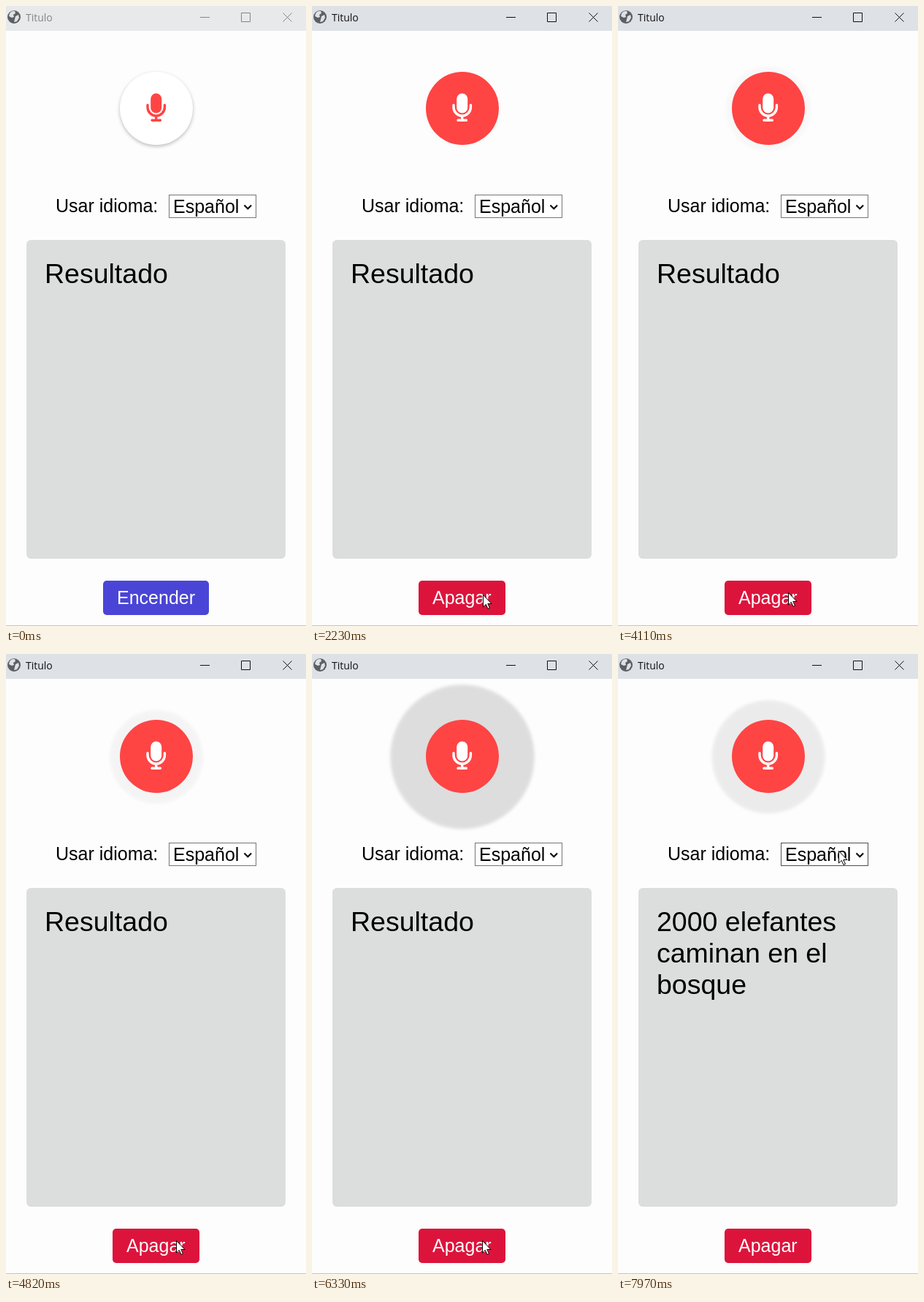
An HTML page that plays this animation: 411x848 px, repeating every 8 s.

```html
<!DOCTYPE html>
<html lang="es">
<head>
<meta charset="utf-8">
<title>Titulo</title>
<style>
html, body { margin: 0; width: 100%; height: 100%; overflow: hidden; background: #fdfdfd; }
#mic { position: absolute; left: 156px; top: 90px; width: 100px; height: 100px; border-radius: 50%; }
svg { position: absolute; left: 0; top: 0; }
text { font: 25px "Liberation Sans", Arial, sans-serif; }
#result text { font-size: 37.5px; }
#bar text { font: 14px "Open Sans", "Noto Sans", sans-serif; }
</style>
</head>
<body>
<div id="mic"></div>
<svg width="411" height="848" viewBox="0 0 411 848">
  <rect id="barBack" width="411" height="34"/>
  <circle cx="11" cy="15" r="9" fill="#5c5f63"/>
  <path d="M5 10q3-4 7-3l1 3-3 2 1 3-3 1-4-2zM13 14l4-2 1 4-3 5-4 1 1-4z" fill="#dfe2e5"/>
  <g id="bar">
    <text x="27" y="21">Titulo</text>
    <path d="M266 15.5h13M322.5 9.5h12v12h-12zM379.500 9.500l12 12m0-12l-12 12" fill="none"/>
  </g>

  <g id="icon" stroke-linecap="round">
    <rect x="198.200" y="119.500" width="15" height="27" rx="7.500" stroke="none"/>
    <path d="M194 135.500v3a11.700 11.700 0 0 0 23.400 0v-3M205.700 151v5M200 156.300h11.400" fill="none" stroke-width="3.400"/>
  </g>

  <text x="68" y="282">Usar idioma:</text>
  <rect id="select" x="223.500" y="258.500" width="119" height="31" fill="#fff"/>
  <text x="229" y="283">Español</text>
  <path d="M326.500 272.500l4.800 4.800 4.800-4.800" fill="none" stroke="#000" stroke-width="2"/>

  <rect x="28" y="320" width="355" height="436" rx="6" fill="#dcdedd"/>
  <g id="result">
    <text x="53" y="379">Resultado</text>
    <g>
      <text x="53" y="379">2000 elefantes</text>
      <text x="53" y="422">caminan en el</text>
      <text x="53" y="465">bosque</text>
    </g>
  </g>

  <rect id="button" y="786" height="47" rx="5"/>
  <text id="label" y="818" fill="#fff"></text>
  <rect y="847" width="411" height="1" fill="#c4c4c4"/>
  <path id="cursor" d="M.5.5v16.500l3.800-3.600 2.700 6 2.500-1.100-2.700-5.800h5.200z" fill="#fff" stroke="#000"/>
</svg>
<script>
const LOOP = 8000, FOCUS = 1580, CLICK = 1670, PULSE = 2193, HEARD = 6700;
const PERIOD = 920, SPREAD = 49, ALPHA = 0.128;

// time, x, y of the pointer tip
const PATH = [
  [130, 380, 856], [160, 367, 838], [500, 300, 822], [920, 235, 807], [1010, 234, 805],
  [2450, 234, 805], [2900, 233, 802], [6480, 233, 802], [6540, 254, 776], [6690, 280, 745],
  [6780, 295, 710], [6920, 315, 668], [7080, 335, 650], [7220, 375, 610], [7330, 388, 500],
  [7400, 386, 390], [7560, 368, 345], [7680, 350, 318], [7850, 318, 280], [7970, 302, 269]
];

const $ = id => document.getElementById(id);
const clamp = v => Math.min(1, Math.max(0, v));
const mix = (a, b, k) => a + (b - a) * k;
const set = (node, attrs) => {
  for (const key in attrs) node.setAttribute(key, attrs[key]);
};
// white to red
const tint = k => `rgb(255,${mix(255, 68, k)},${mix(255, 68, k)})`;

function pointer(t) {
  let i = 1;
  while (i < PATH.length - 1 && t > PATH[i][0]) i++;
  const [t0, x0, y0] = PATH[i - 1], [t1, x1, y1] = PATH[i];
  const k = clamp((t - t0) / (t1 - t0));
  return [mix(x0, x1, k), mix(y0, y1, k)];
}

function drawMic(t) {
  const on = clamp((t - CLICK) / 450);
  const k = on * on * (3 - 2 * on);
  const phase = Math.max(0, t - PULSE) / PERIOD % 1;
  const wave = 1 - Math.abs(1 - 2 * phase);
  $("mic").style.background = tint(k);
  $("mic").style.boxShadow = t < PULSE
    ? `0 2px 5px rgba(0,0,0,${0.26 * (1 - k)})`
    : `0 .7px 4px ${SPREAD * wave}px rgba(0,0,0,${ALPHA * wave})`;
  set($("icon"), { fill: tint(1 - k), stroke: tint(1 - k) });
}

function draw(t) {
  const active = t >= FOCUS, on = t >= CLICK, heard = t >= HEARD;
  const ink = active ? "#111" : "#858585";
  set($("barBack"), { fill: active ? "#dee1e6" : "#e7e9ea" });
  set($("bar"), { fill: ink, stroke: "none" });
  set($("bar").lastElementChild, { stroke: ink });

  drawMic(t);

  set($("button"), on
    ? { x: 146, width: 119, fill: "#dc143c" }
    : { x: 133, width: 145, fill: "#4a45d6" });
  set($("label"), { x: on ? 165 : 152 });
  $("label").textContent = on ? "Apagar" : "Encender";

  const [before, after] = $("result").children;
  set(before, { visibility: heard ? "hidden" : "visible" });
  set(after, { visibility: heard ? "visible" : "hidden" });

  const [x, y] = pointer(t);
  set($("cursor"), { transform: `translate(${Math.round(x)} ${Math.round(y)})` });
  set($("select"), { stroke: x < 343 && y < 290 ? "#4f4f4f" : "#767676" });
}

const start = performance.now();
function tick() {
  draw((performance.now() - start) % LOOP);
  requestAnimationFrame(tick);
}
tick();
</script>
</body>
</html>
```
